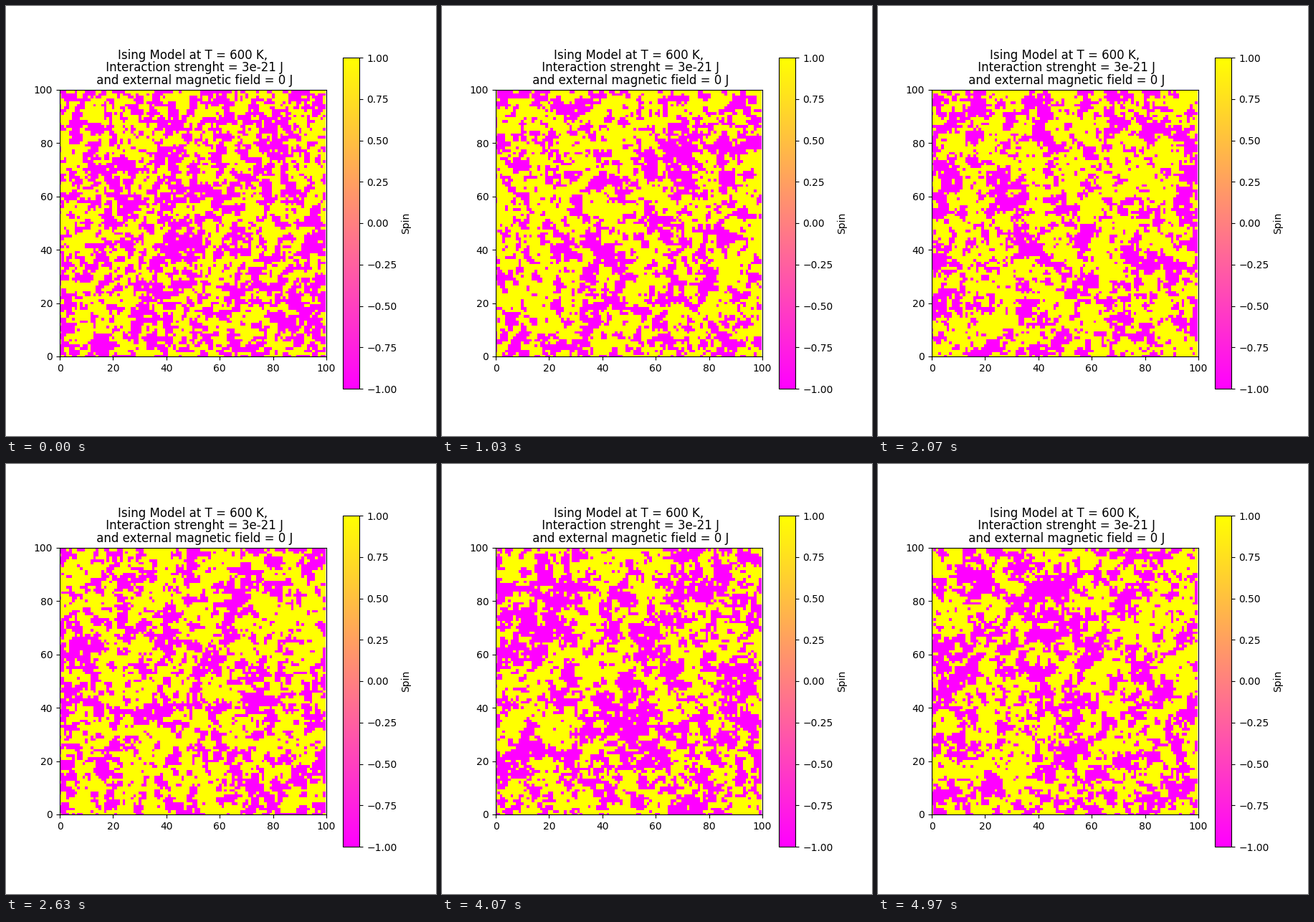
Recreate the animation shown at these times as a matplotlib script. Size 600x600 px, loop 5000 ms.

```python
import numpy as np
import matplotlib.pyplot as plt
from matplotlib.animation import FuncAnimation

N = 100
FRAMES = 150
J, T, FIELD = 3e-21, 600, 0
K = J / (1.380649e-23 * T)

rng = np.random.default_rng(12)
parity = np.add.outer(np.arange(N), np.arange(N)) % 2


def sweep(spins, bias):
    """One Metropolis sweep: each pass tries a random half of a sublattice."""
    for color in (0, 1, 0, 1):
        near = sum(np.roll(spins, d, axis) for d in (-1, 1) for axis in (0, 1))
        accept = np.exp(-2 * spins * (K * near + bias))
        tried = (parity == color) & (rng.random((N, N)) < 0.5)
        spins = np.where(tried & (rng.random((N, N)) < accept), -spins, spins)
    return spins


def simulate():
    # slow wander of the mean spin
    drift = np.interp(np.arange(FRAMES),
                      [0, 17, 46, 79, 104, 122, 149],
                      [0.04, 0.15, 0.26, 0.2, 0.16, 0.06, 0.1])
    spins = np.where(rng.random((N, N)) < 0.52, 1, -1)
    spins = sweep(spins, 0)
    states = []
    for mean in drift:
        spins = sweep(spins, mean - spins.mean())
        states.append(spins)
    return states


states = simulate()

fig, ax = plt.subplots(figsize=(6, 6), dpi=100)
image = ax.imshow(states[0], cmap="spring", vmin=-1, vmax=1,
                  interpolation="nearest")
fig.colorbar(image, ax=ax, label="Spin")
ax.set_xlim(0, N)
ax.set_ylim(0, N)
ax.set_title(f"Ising Model at T = {T} K,\n Interaction strenght = {J} J"
             f"\n and external magnetic field = {FIELD} J", linespacing=0.96)


def update(i):
    image.set_data(states[i])
    return [image]


anim = FuncAnimation(fig, update, frames=FRAMES, interval=5000 / FRAMES,
                     repeat=True, repeat_delay=0)
plt.show()
```
